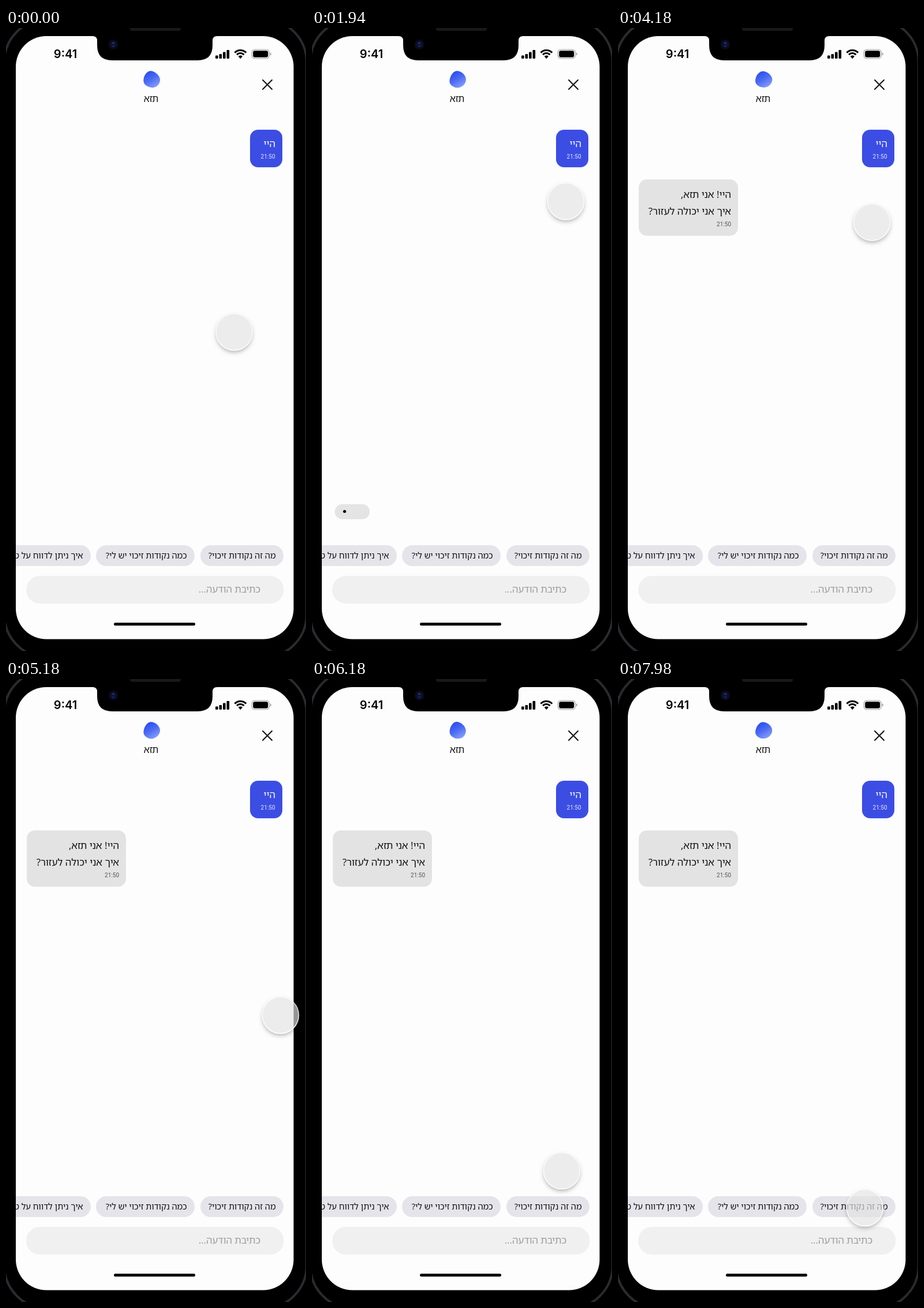
Animation, 520 px wide and 1078 px high, one loop 8 s. Source, as an HTML page with a canvas:

```html
<!DOCTYPE html>
<html lang="he">
<head>
<meta charset="utf-8">
<title>Chat</title>
<style>
html, body { margin: 0; width: 100%; height: 100%; overflow: hidden; background: #000; }
canvas { display: block; width: 520px; height: 1078px; }
</style>
</head>
<body>
<canvas id="stage"></canvas>
<script>
const W = 520, H = 1078, LOOP = 8000;
const HEBREW = '"Open Sans", "Noto Sans Hebrew", "Noto Sans", "Liberation Sans", sans-serif';
const LATIN = 'Roboto, "Liberation Sans", sans-serif';
const NAME = 'תזא';
const CHIPS = [
  [337, 144, 'מה זה נקודות זיכוי?'],
  [156, 171, 'כמה נקודות זיכוי יש לי?'],
  [-60, 207, 'איך ניתן לדווח על טעות?']
];

const canvas = document.getElementById('stage');
const dpr = window.devicePixelRatio || 1;
canvas.width = W * dpr;
canvas.height = H * dpr;
const ctx = canvas.getContext('2d');

// Evens out the letter size between Hebrew fallback fonts.
ctx.direction = 'rtl';
ctx.font = `100px ${HEBREW}`;
const scale = 780 / ctx.measureText(CHIPS[0][2]).width;

function box(x, y, w, h, r, fill) {
  ctx.beginPath();
  ctx.roundRect(x, y, w, h, r);
  ctx.fillStyle = fill;
  ctx.fill();
}

function disc(x, y, r, fill) {
  ctx.beginPath();
  ctx.arc(x, y, r, 0, Math.PI * 2);
  ctx.fillStyle = fill;
  ctx.fill();
}

function hebrew(str, x, y, size, fill, align = 'right') {
  ctx.direction = 'rtl';
  ctx.textAlign = align;
  ctx.font = `${size * scale}px ${HEBREW}`;
  ctx.fillStyle = fill;
  ctx.fillText(str, x, y);
}

function latin(str, x, y, font, fill, align = 'right') {
  ctx.direction = 'ltr';
  ctx.textAlign = align;
  ctx.font = font;
  ctx.fillStyle = fill;
  ctx.fillText(str, x, y);
}

function drawBezel() {
  ctx.fillStyle = '#000';
  ctx.fillRect(0, 0, W, H);
  ctx.beginPath();
  ctx.roundRect(-3, -15, 524, 1104, 74);
  ctx.lineWidth = 4;
  ctx.strokeStyle = '#292c2f';
  ctx.stroke();
  box(215, -4, 88, 9, 4, '#17181a');
  box(17, 14, 481.5, 1043.5, 53, '#fdfdfd');
}

function drawNotch() {
  ctx.beginPath();
  ctx.moveTo(150, 13);
  ctx.lineTo(150, 14);
  ctx.quadraticCurveTo(158, 14, 158, 22);
  ctx.lineTo(158, 30);
  ctx.quadraticCurveTo(158, 56, 184, 56);
  ctx.lineTo(332, 56);
  ctx.quadraticCurveTo(358, 56, 358, 30);
  ctx.lineTo(358, 22);
  ctx.quadraticCurveTo(358, 14, 366, 14);
  ctx.lineTo(366, 13);
  ctx.fillStyle = '#000';
  ctx.fill();
  disc(186, 28.5, 8.5, '#090b16');
  disc(186, 28.5, 5.5, '#0d1233');
  disc(186, 26, 1.8, '#26347c');
  disc(186, 31.5, 1.6, '#1d2a68');
}

function drawStatus() {
  latin('9:41', 103, 52, '600 20px Inter, "Liberation Sans", sans-serif', '#000', 'center');
  [5.5, 8, 11.5, 15].forEach((h, i) => box(363 + i * 6.5, 53 - h, 4.6, h, 1.3, '#000'));

  ctx.strokeStyle = '#000';
  ctx.lineWidth = 3;
  for (const r of [13.5, 8.5]) {
    ctx.beginPath();
    ctx.arc(406.3, 52, r, -Math.PI * 0.76, -Math.PI * 0.24);
    ctx.stroke();
  }
  ctx.beginPath();
  ctx.moveTo(406.3, 53.2);
  ctx.arc(406.3, 52.4, 5, -Math.PI * 0.76, -Math.PI * 0.24);
  ctx.closePath();
  ctx.fillStyle = '#000';
  ctx.fill();

  ctx.beginPath();
  ctx.roundRect(426.2, 37.2, 30, 15.6, 5);
  ctx.lineWidth = 1.1;
  ctx.strokeStyle = '#9c9c9c';
  ctx.stroke();
  box(428.2, 39.2, 26, 11.6, 3.2, '#000');
  box(457.8, 42.4, 1.8, 5.2, [0, 2, 2, 0], '#9c9c9c');
}

function drawBlob(t) {
  const n = 7, pts = [];
  const wave = t / 1000;
  for (let i = 0; i < n; i++) {
    const a = i / n * Math.PI * 2;
    const r = 15.8 + 1.1 * Math.cos(3 * a - 1.1 + 0.25 * Math.sin(wave * 1.6))
      + 0.5 * Math.sin(2 * a + wave * 1.9);
    pts.push([252.5 + r * Math.cos(a), 89.2 + r * Math.sin(a)]);
  }
  const mid = (p, q) => [(p[0] + q[0]) / 2, (p[1] + q[1]) / 2];
  ctx.beginPath();
  ctx.moveTo(...mid(pts[n - 1], pts[0]));
  pts.forEach((p, i) => ctx.quadraticCurveTo(...p, ...mid(p, pts[(i + 1) % n])));
  ctx.closePath();
  const g = ctx.createLinearGradient(244, 76, 260, 103);
  g.addColorStop(0, '#2b4cee');
  g.addColorStop(0.45, '#4a69f3');
  g.addColorStop(1, '#88a1fa');
  ctx.fillStyle = g;
  ctx.fill();
}

function drawHeader(t) {
  drawBlob(t);
  hebrew(NAME, 251.5, 128, 16.5, '#111', 'center');
  ctx.beginPath();
  ctx.moveTo(445, 90);
  ctx.lineTo(461, 106);
  ctx.moveTo(461, 90);
  ctx.lineTo(445, 106);
  ctx.lineWidth = 2;
  ctx.lineCap = 'round';
  ctx.strokeStyle = '#111';
  ctx.stroke();
  ctx.lineCap = 'butt';
}

function drawChat(t) {
  box(423, 176, 56, 65, 14, '#3c4de4');
  hebrew('היי', 467, 206, 17.3, '#fff');
  latin('21:50', 466.5, 226, `10px ${LATIN}`, '#e4e7ff');

  if (t >= 1600 && t < 3600) {
    box(39.5, 824, 60.5, 26, 13, '#e4e4e4');
    const step = Math.floor((t - 1600) / 400) % 3;
    disc(56.5 + step * 12.6, 836.5, 2.6, '#000');
  }
  if (t >= 3600) {
    box(36, 262, 172, 97.5, 14, '#e3e3e3');
    hebrew(`היי! אני ${NAME},`, 196, 294, 17.4, '#111');
    hebrew('איך אני יכולה לעזור?', 196, 323, 17.4, '#111');
    latin('21:50', 196, 342.5, `10px ${LATIN}`, '#555');
  }
}

function drawFooter() {
  ctx.save();
  ctx.beginPath();
  ctx.rect(17, 880, 481, 130);
  ctx.clip();
  for (const [x, w, label] of CHIPS) {
    box(x, 895, w, 36, 18, '#e4e4ea');
    hebrew(label, x + w - 13.5, 918, 15, '#111');
  }
  ctx.restore();
  box(35, 948, 446.5, 48, 24, '#f0f0f0');
  hebrew('כתיבת הודעה...', 441, 976.5, 17.2, '#9c9c9c');
  box(187, 1029, 141, 5, 2.5, '#000');
}

// The pointer swings up on a left arc, rests, then returns on a right arc.
function pointerAt(t) {
  const rising = t < 2500;
  const u = Math.min(1, Math.max(0, rising ? 0.585 + t / 3150 : (t - 3690) / 3150));
  const s = (1 - Math.cos(Math.PI * u)) / 2;
  const bulge = Math.pow(Math.sin(Math.PI * u), 5);
  return rising
    ? [428 + 12 * s - 48 * bulge, 915 - 615 * s]
    : [440 - 12 * s + 42 * bulge, 300 + 615 * s];
}

function drawPointer(t) {
  const [x, y] = pointerAt(t), r = 32;
  ctx.save();
  ctx.beginPath();
  ctx.rect(0, 0, W, H);
  ctx.arc(x, y, r, 0, Math.PI * 2);
  ctx.clip('evenodd');
  ctx.shadowColor = 'rgba(0,0,0,0.27)';
  ctx.shadowBlur = 7 * dpr;
  ctx.shadowOffsetY = 4 * dpr;
  disc(x, y, r - 0.5, '#fff');
  ctx.restore();

  disc(x, y, r, 'rgba(228,228,228,0.66)');
  ctx.beginPath();
  ctx.arc(x, y, r - 0.4, 0, Math.PI * 2);
  const g = ctx.createLinearGradient(0, y - r, 0, y + r);
  g.addColorStop(0, 'rgba(255,255,255,0.55)');
  g.addColorStop(1, '#fff');
  ctx.lineWidth = 1.6;
  ctx.strokeStyle = g;
  ctx.stroke();
}

function draw(t) {
  ctx.setTransform(dpr, 0, 0, dpr, 0, 0);
  drawBezel();
  drawNotch();
  drawStatus();
  drawHeader(t);
  drawChat(t);
  drawFooter();
  drawPointer(t);
}

const start = performance.now();
function tick() {
  draw((performance.now() - start) % LOOP);
  requestAnimationFrame(tick);
}
tick();
</script>
</body>
</html>
```
